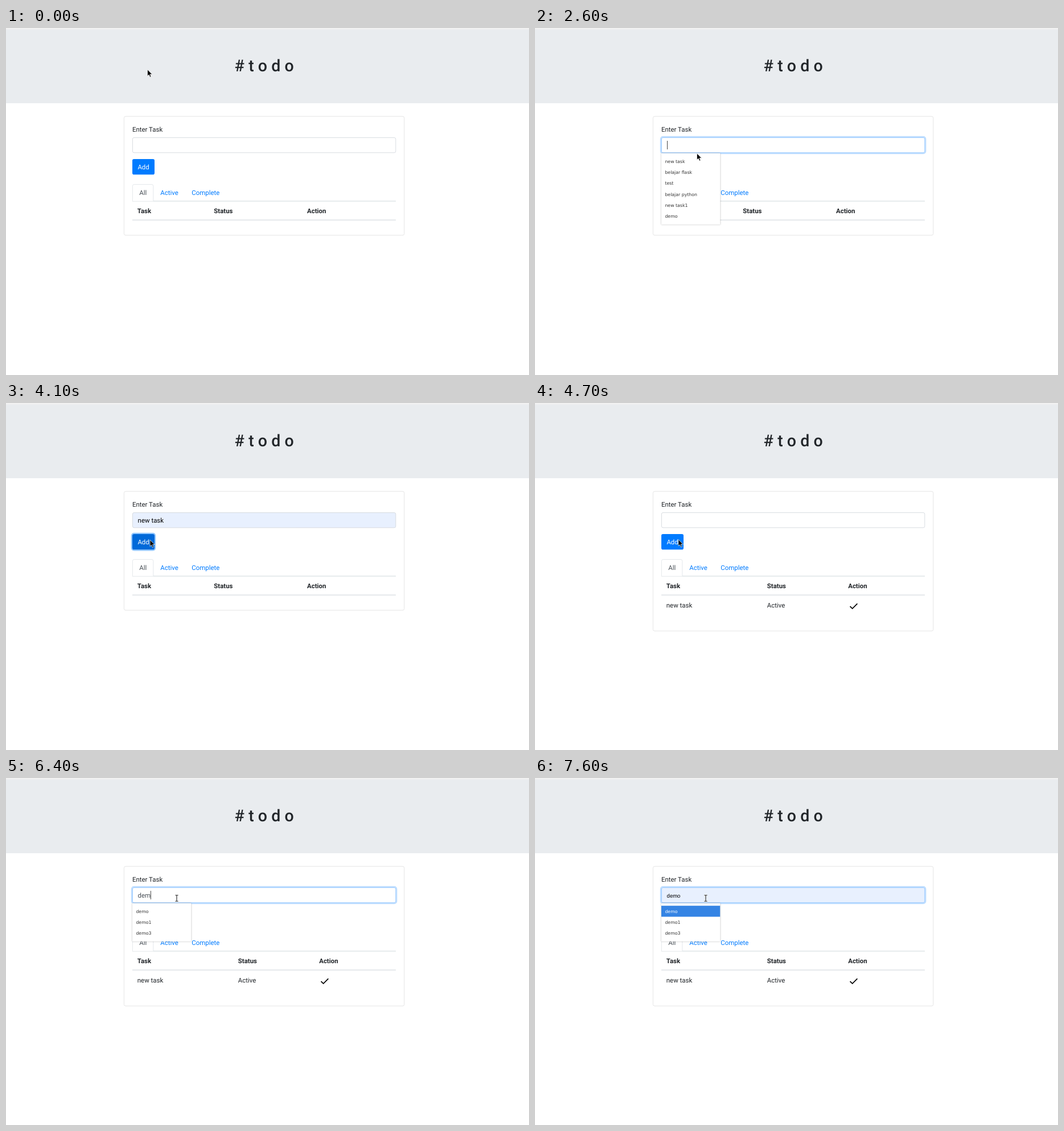
An HTML page for the animation above (8000 ms loop, 919 by 609 pixels).

```html
<!DOCTYPE html>
<html lang="en">
<head>
<meta charset="utf-8">
<title>#todo</title>
<style>
  html, body { margin: 0; width: 100%; height: 100%; overflow: hidden; background: #fff; }
  svg { display: block; width: 919px; height: 609px; }
  text { font: 11.44px Roboto, sans-serif; fill: #212529; text-rendering: geometricPrecision; white-space: pre; }
  rect, path { fill: none; }
  .line { stroke: #dee2e6; stroke-width: .8; }
  .head text { font-weight: 700; }
  .link { fill: #007bff; }
  #popup text { font: 7.8px "DejaVu Sans", sans-serif; fill: #333; }
  #popup text.on { fill: #fff; }
  #box { filter: drop-shadow(0 .8px .8px #0005); }
  #value.preview { font: 9.53px "Liberation Sans", sans-serif; }
</style>
</head>
<body>
<svg viewBox="0 0 919 609">
  <rect width="919" height="132" style="fill:#e9ecef"/>
  <rect width="919" height="2.5" style="fill:#f2f2f2"/>
  <text x="453.7" y="76" text-anchor="middle" style="font-size:28.6px;font-weight:500"># t o d o</text>

  <rect id="card" x="207.4" y="155.1" width="492.4" rx="2.8" stroke="#dfdfdf" stroke-width=".8"/>
  <text x="222" y="182.2">Enter Task</text>
  <rect id="inputRing" x="220.9" y="190.9" width="465.4" height="29.3" rx="4" stroke="#007bff" stroke-opacity=".25" stroke-width="2.2"/>
  <rect id="input" x="222.4" y="192.4" width="462.4" height="26.4" rx="2.6" stroke-width=".8"/>
  <text id="value" x="231.6" y="209.6"></text>
  <rect id="caret" y="198" width=".9" height="15" style="fill:#333"/>

  <rect id="buttonRing" x="220.9" y="228.9" width="41.2" height="29.4" rx="4" stroke="#268fff" stroke-opacity=".5" stroke-width="2.2"/>
  <rect id="button" x="222" y="230" width="39" height="27.2" rx="2.8"/>
  <text x="231.4" y="247.8" style="fill:#fff">Add</text>

  <path class="line" d="M222 304.2H685M259 303.4H685M222.4 303.8V277.3Q222.4 274.5 225.2 274.5H256Q258.8 274.5 258.8 277.3V303.8"/>
  <text x="234.3" y="293.2" style="fill:#495057">All</text>
  <text class="link" x="271.3" y="293.2">Active</text>
  <text class="link" x="326.3" y="293.2">Complete</text>
  <path class="line" d="M222 337.1H685" style="stroke-width:1.5"/>
  <g class="head">
    <text x="230.8" y="325.2">Task</text>
    <text id="status" y="325.2">Status</text>
    <text id="action" y="325.2">Action</text>
  </g>
  <g id="row">
    <text x="230.8" y="358.7">new task</text>
    <text x="407.8" y="358.7">Active</text>
    <path d="M553.6 356.8L557.7 360.9L566.4 352.2" stroke="#000" stroke-width="1.7"/>
  </g>

  <g id="popup">
    <rect id="box" x="222" y="219.8" width="103.4" style="fill:#fff"/>
    <rect id="highlight" x="222" y="224.2" width="103.2" height="19.3" style="fill:#3584e4"/>
    <g id="items"></g>
  </g>

  <path id="arrow" d="M0 0V11.4L2.6 9L4.5 13.2L6.4 12.4L4.6 8.3H8.2Z" style="fill:#000" stroke="#fff" stroke-width=".7"/>
  <g id="beam">
    <path d="M-2.6-5.2H2.6M0-5.2V5.2M-2.6 5.2H2.6" stroke="#fff" stroke-width="2.2"/>
    <path d="M-2.6-5.2H2.6M0-5.2V5.2M-2.6 5.2H2.6" stroke="#222" stroke-width="1.1"/>
  </g>
</svg>
<script>
const LOOP = 8000;
const recent = ['new task', 'belajar flask', 'test', 'belajar python', 'new task1', 'demo'];
const matches = ['demo', 'demo1', 'demo3'];
const $ = id => document.getElementById(id);
const set = (id, attrs) => Object.entries(attrs).forEach(([k, v]) => $(id).setAttribute(k, v));
const show = (id, on) => set(id, { visibility: on ? 'visible' : 'hidden' });
const arrow = (x, y) => ({ pointer: 'arrow', x, y });
const beam = (x, y) => ({ pointer: 'beam', x, y });

// Each step overrides part of the state from its time on.
const steps = [
  [0, { ...arrow(248.6, 73), focus: 0, value: '', caret: 0, popup: null, filled: false, preview: false,
        hover: false, pressed: false, added: false }],
  [300, beam(275, 211)],
  [600, beam(290, 208)],
  [700, beam(300, 206)],
  [800, { ...beam(306, 204), focus: .6, caret: 232 }],
  [900, { focus: 1, popup: recent }],
  [1400, { caret: 0 }],
  [2000, { caret: 232 }],
  [2500, beam(299, 212)],
  [2600, arrow(284.5, 220)],
  [3200, { ...arrow(264.6, 246.4), popup: null, value: 'new task', filled: true, caret: 276.4, hover: true }],
  [3400, { ...arrow(305.2, 267.3), hover: false }],
  [3700, { ...arrow(253, 240.3), hover: true, caret: 0 }],
  [4100, { focus: 0, pressed: true }],
  [4500, { value: '', filled: false, hover: false, pressed: false, added: true }],
  [4700, arrow(252, 239.6)],
  [5100, beam(300, 211)],
  [5600, { focus: 1, caret: 232, popup: recent }],
  [6000, { caret: 0 }],
  [6400, { value: 'dem', caret: 253.9, popup: matches }],
  [6600, { value: 'demo', caret: 260.2 }],
  [7200, { caret: 0 }],
  [7600, { filled: true, preview: true }]
];

function drawPopup(list, selected) {
  show('popup', list);
  show('highlight', list && selected);
  if (!list) return $('items').replaceChildren();
  set('box', { height: 9 + list.length * 19.35 });
  $('items').innerHTML = list.map((name, i) =>
    `<text x="228.4" y="${236.5 + i * 19.35}" class="${selected && !i ? 'on' : ''}">${name}</text>`).join('');
}

function draw(s) {
  set('card', { height: s.added ? 245 : 208.6 });
  set('status', { x: s.added ? 407.8 : 365.3 });
  set('action', { x: s.added ? 550.2 : 529 });
  show('row', s.added);
  set('inputRing', { opacity: s.focus });
  set('input', { stroke: s.focus ? '#80bdff' : '#ced4da', style: `fill:${s.filled ? '#e8f0fe' : '#fff'}` });
  $('value').textContent = s.value;
  set('value', { class: s.preview ? 'preview' : '', style: `fill:${s.filled ? '#000' : '#495057'}` });
  show('caret', s.caret);
  set('caret', { x: s.caret });
  show('buttonRing', s.pressed);
  set('button', { style: `fill:${s.hover ? '#0069d9' : '#007bff'}` });
  drawPopup(s.popup, s.preview);
  for (const id of ['arrow', 'beam']) show(id, s.pointer === id);
  set(s.pointer, { transform: `translate(${s.x} ${s.y})` });
}

const start = performance.now();
let shown = 0;
function tick() {
  const time = (performance.now() - start) % LOOP;
  const active = steps.filter(([at]) => at <= time);
  if (active.length !== shown) {
    shown = active.length;
    draw(Object.assign({}, ...active.map(([, change]) => change)));
  }
  requestAnimationFrame(tick);
}
tick();
</script>
</body>
</html>
```
